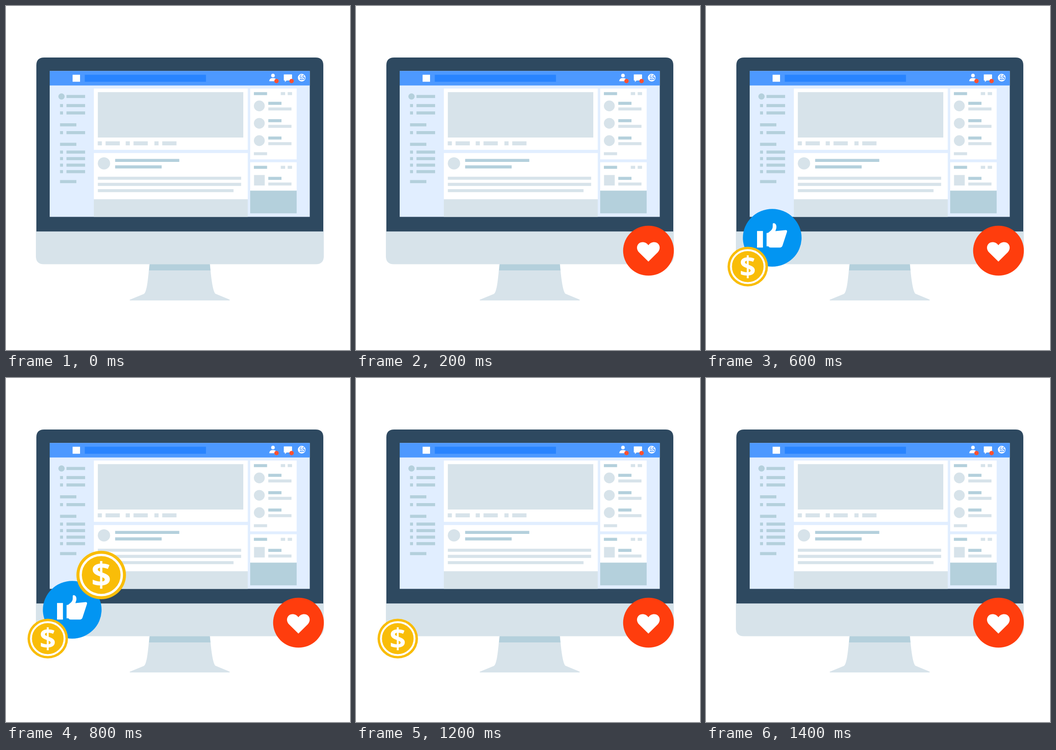
Write an HTML page that moves like this. It is 748 px wide and 748 px high and loops after 1.6 s.

```html
<!DOCTYPE html>
<html lang="en">
<head>
<meta charset="utf-8">
<title>Social feed on a desktop screen</title>
<style>
  html, body { margin: 0; width: 100%; height: 100%; overflow: hidden; background: #fff; }
  svg { display: block; width: 100vw; height: 100vh; }
  .pale { fill: #d7e3ea; }
  .mid { fill: #b4d0dc; }
  .white { fill: #fff; }
  .badge { fill: #ff5130; }
  .pop { visibility: hidden; }
  text { font: 700 62px "Open Sans", "Noto Sans", sans-serif; text-anchor: middle; }
</style>
</head>
<body>
<svg viewBox="0 0 748 748">
  <defs>
    <g id="row">
      <rect class="mid" x="117.500" width="6.500" height="6.700"/>
      <rect class="mid" x="131.500" width="40.500" height="6.700"/>
    </g>
    <rect id="heading" class="mid" x="117.500" width="35.500" height="6.700"/>
    <g id="action" class="pale">
      <rect y="294.300" width="9" height="8.700"/>
      <rect x="17" y="294.300" width="31" height="8.700"/>
    </g>
    <g id="lines">
      <rect class="mid" x="570.300" width="28.700" height="6.600"/>
      <rect class="pale" x="570.300" y="12.300" width="50.400" height="6.500"/>
    </g>
    <g id="contact">
      <ellipse class="pale" cx="550.800" cy="9" rx="11.800" ry="11.700"/>
      <use href="#lines"/>
    </g>
    <g id="title">
      <rect class="mid" x="539" width="28.700" height="6.500"/>
      <path class="pale" d="M597.500 0h9.500v6.500h-9.500zM612.500 0h9.500v6.500h-9.500z"/>
    </g>
    <g id="coin">
      <circle r="44" fill="#f9bd08"/>
      <circle r="36.500" fill="none" stroke="#fff" stroke-width="4.200"/>
      <text class="white" y="21.700">$</text>
    </g>
  </defs>

  <!-- monitor -->
  <path class="pale" d="M65 490H691V544Q691 561.500 673.500 561.500H82.500Q65 561.500 65 544Z"/>
  <path fill="#2e4960" d="M66 490.300V129Q66 112 83 112H673Q690 112 690 129V490.300Z"/>
  <path class="pale" d="M312 561.500H443.500C446 590 449 617 455 625.500L484 637.500Q488 639.300 486 640.300H270Q267 639.300 272 637.500L300 626C307 621 309 590 312 561.500Z"/>
  <path class="mid" d="M312.300 561.500H443.300L444.500 575H311Z"/>

  <!-- top bar -->
  <rect x="95" y="141.300" width="565.500" height="317.200" fill="#e1eeff"/>
  <rect x="95" y="141.300" width="565.500" height="31.500" fill="#4d99ff"/>
  <rect class="white" x="144.800" y="149.500" width="16.200" height="15.200"/>
  <rect x="171.300" y="149.500" width="263.500" height="15.200" fill="#2984ff"/>
  <circle class="white" cx="580.500" cy="151.200" r="3.900"/>
  <path class="white" d="M572.500 163.500C572.500 158.500 576 156.700 580.500 156.700S588.500 158.500 588.500 163.500Z"/>
  <circle class="badge" cx="588.200" cy="163.200" r="4.800"/>
  <path class="white" d="M604.500 148.700H621q1 0 1 1V161q0 1 -1 1H610L606.500 165.500V162H605q-1 0 -1 -1V149.700q0 -1 .5 -1Z"/>
  <circle class="badge" cx="621" cy="163.200" r="4.800"/>
  <circle class="white" cx="643" cy="155.900" r="8.400"/>
  <path d="M639.500 151.200l3 -1.200M638 154.300h4l-1 5.500h-2.500M640.500 160l3.500 .5M648 150.500l-2.500 1.500v3.500l3 -.8q2 2.500 -.5 4.800l-3.300 .2v-2.500" fill="none" stroke="#4d99ff" stroke-width="1.500"/>

  <!-- sidebar -->
  <ellipse class="mid" cx="120.700" cy="196.700" rx="6.900" ry="6.700"/>
  <rect class="mid" x="131.500" y="193.400" width="40.500" height="6.700"/>
  <use href="#row" y="213.200"/>
  <use href="#row" y="229.200"/>
  <use href="#heading" y="255"/>
  <use href="#row" y="272"/>
  <use href="#heading" y="297.400"/>
  <use href="#row" y="314.300"/>
  <use href="#row" y="328.500"/>
  <use href="#row" y="342.700"/>
  <use href="#row" y="356.800"/>
  <use href="#heading" y="378.500"/>

  <!-- feed -->
  <path class="white" d="M191 179.500h334.700v133.300H191zM191 319.800h334.700v101H191z"/>
  <rect class="pale" x="199.700" y="187.300" width="316.300" height="98.700"/>
  <use href="#action" x="199.500"/>
  <use href="#action" x="260.300"/>
  <use href="#action" x="322.700"/>
  <ellipse class="pale" cx="213" cy="342.200" rx="13.400" ry="13.200"/>
  <path class="mid" d="M237.300 332.400h139.500v6.700H237.300zM237.300 346.600h101.200v6.700H237.300z"/>
  <path class="pale" d="M199.700 371.200h311.600v6.500H199.700zM199.700 384.600h311.600v6.600H199.700zM199.700 398.200h295v6.500h-295zM191 420.300h334.700v38.200H191z"/>

  <!-- right column -->
  <path class="white" d="M531 179.500h101v154H531zM531 339.700h101v62H531z"/>
  <use href="#title" y="187.300"/>
  <use href="#contact" y="208.300"/>
  <use href="#contact" y="246.100"/>
  <use href="#contact" y="283.800"/>
  <rect class="pale" x="539" y="318" width="28.700" height="6.400"/>
  <use href="#title" y="347.500"/>
  <rect class="pale" x="539.300" y="367.500" width="23.300" height="22.800"/>
  <use href="#lines" y="371.500"/>
  <rect class="mid" x="531" y="401.500" width="101" height="49.300"/>

  <!-- reactions: data-n is the place in the order of appearance -->
  <g class="pop" data-n="1">
    <ellipse cx="636" cy="532" rx="55.200" ry="54.300" fill="#ff3d0d"/>
    <path class="white" d="M635.800 555.800L615.500 535.800C606.500 526 612.500 513.500 623 513.500C628.500 513.500 633 516 635.800 520.300C638.600 516 643 513.500 648.500 513.500C659 513.500 665 526 656 535.800Z"/>
  </g>
  <g class="pop" data-n="3">
    <ellipse cx="144" cy="504" rx="63.800" ry="62.700" fill="#0295f2"/>
    <path class="white" d="M111 489.300h12.800v36H111zM131.700 493.800L135.500 493C139 489.500 144.500 487 145 480.500L145.200 473.500Q145.500 472 147.500 472.200C153 473 154 479.500 152.500 484.500L150.800 489.500L173.500 487.300Q177 487.500 176 491.500L166.500 520.500Q165 525.300 160.500 525.300H140.500Q137.500 525.300 135.500 522.500H131.700Z"/>
  </g>
  <use class="pop" data-n="2" href="#coin" transform="translate(90.800 566.700) scale(1 .98)"/>
  <use class="pop" data-n="4" href="#coin" transform="translate(207 428.300) scale(1.225 1.195)"/>
</svg>
<script>
  const STEP = 200, STEPS = 8;
  const pops = document.querySelectorAll(".pop");

  // Reactions appear one by one, then leave in reverse order.
  function draw(now) {
    const step = Math.floor(now / STEP) % STEPS;
    const count = Math.min(step, STEPS - step);
    for (const pop of pops) {
      pop.style.visibility = pop.dataset.n <= count ? "visible" : "hidden";
    }
  }

  let start;
  function tick(now) {
    start ??= now;
    draw(now - start);
    requestAnimationFrame(tick);
  }
  requestAnimationFrame(tick);
</script>
</body>
</html>
```
